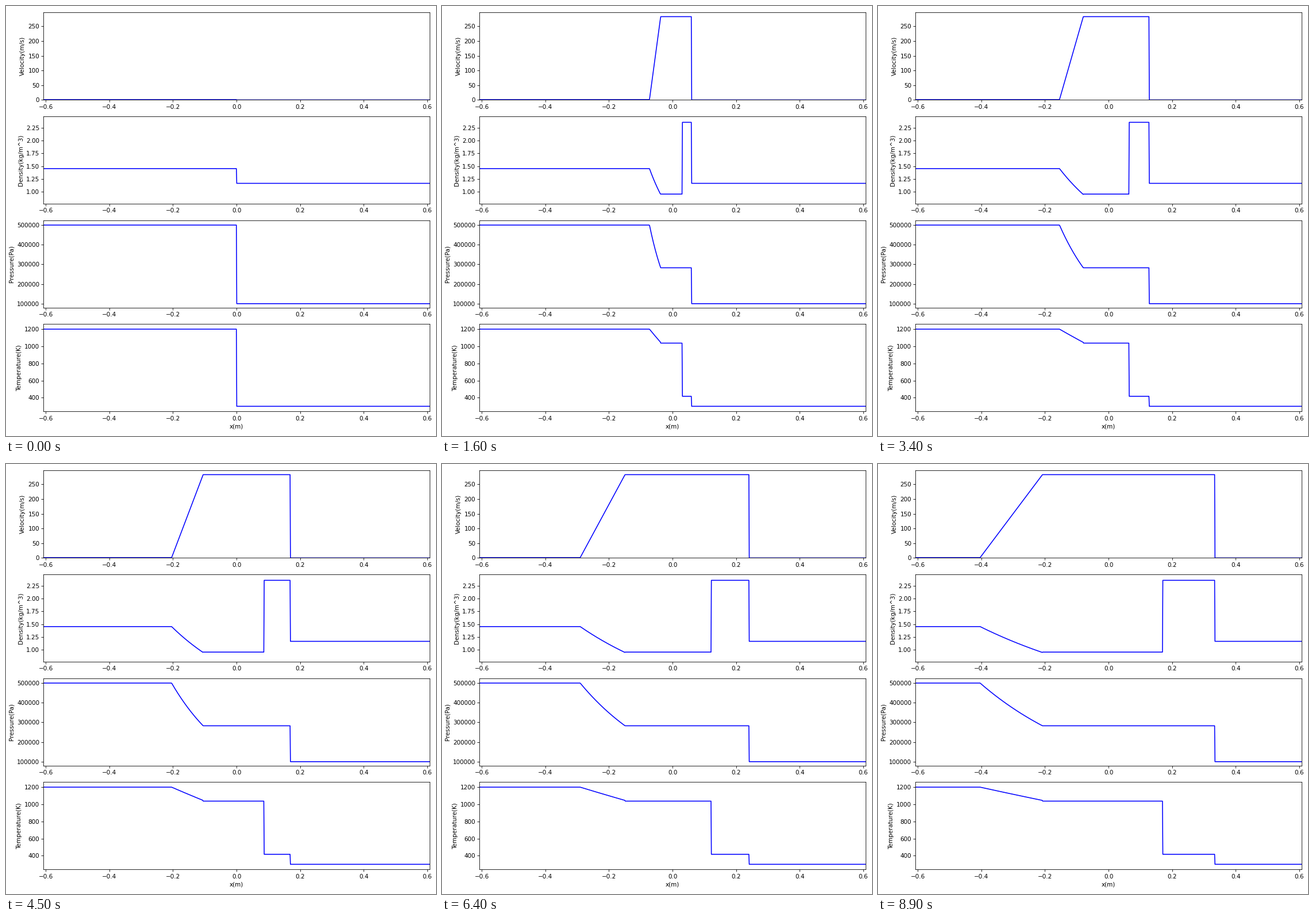
Recreate the animation shown at these times as a matplotlib script. Size 748 by 748 pixels, loop 9000 ms.

```python
import numpy as np
import matplotlib.pyplot as plt
from matplotlib.animation import FuncAnimation

SIZE, DPI = 748, 75
FRAMES, T_END = 90, 6e-4
R = 287.0

# Left and right initial states
pL, TL, uL, gL = 5e5, 1200.0, 1.0, 1.319
pR, TR, uR, gR = 1e5, 300.0, 0.0, 1.4
cL, cR = np.sqrt(gL * R * TL), np.sqrt(gR * R * TR)

# Star region: common pressure and velocity, two temperatures
p_star, T_hot = 2.826e5, 1037.0
mach = np.sqrt(1 + (gR + 1) / (2 * gR) * (p_star / pR - 1))
u_star = uR + 2 * cR / (gR + 1) * (mach - 1 / mach)
squeeze = (gR + 1) * mach**2 / ((gR - 1) * mach**2 + 2)
T_cold = TR * p_star / pR / squeeze

# Wave speeds
head = uL - cL
tail = u_star - cL + (gL - 1) / 2 * (u_star - uL)
contact = u_star
shock = uR + mach * cR

x_max = 1.5 * cL * T_END
x = np.linspace(-x_max, x_max, 1000)


def solve(t):
    """Velocity, density, pressure and temperature along x at time t."""
    s = x / max(t, 1e-12)
    zones = [s < head, s < tail, s < contact, s < shock]
    u_fan = uL + 2 / (gL + 1) * (np.clip(s, head, tail) - head)
    c_ratio = 1 - (gL - 1) / 2 * (u_fan - uL) / cL
    p_fan = pL * c_ratio ** (2 * gL / (gL - 1))
    T_fan = TL * c_ratio**2
    u = np.select(zones, [uL, u_fan, u_star, u_star], uR)
    p = np.select(zones, [pL, p_fan, p_star, p_star], pR)
    T = np.select(zones, [TL, T_fan, T_hot, T_cold], TR)
    return u, p / (R * T), p, T


rho_low, rho_high = p_star / (R * T_hot), p_star / (R * T_cold)
panels = [
    ("Velocity(m/s)", 0, u_star),
    ("Density(kg/m^3)", rho_low, rho_high),
    ("Pressure(Pa)", pR, pL),
    ("Temperature(K)", TR, TL),
]

fig, axes = plt.subplots(4, 1, figsize=(SIZE / DPI, SIZE / DPI), dpi=DPI,
                         facecolor="white")
lines = []
for ax, (label, low, high) in zip(axes, panels):
    ax.set_xlim(-x_max, x_max)
    ax.set_ylim(0.8 * low, 1.05 * high)
    ax.set_ylabel(label)
    lines += ax.plot([], [], color="blue", lw=1.5)
axes[-1].set_xlabel("x(m)")
fig.tight_layout()
fig.subplots_adjust(left=65.4 / SIZE, right=736.75 / SIZE)


def update(i):
    for line, values in zip(lines, solve(T_END * i / (FRAMES - 1))):
        line.set_data(x, values)
    return lines


anim = FuncAnimation(fig, update, frames=FRAMES, interval=100,
                     repeat=True, repeat_delay=0)
plt.show()
```
